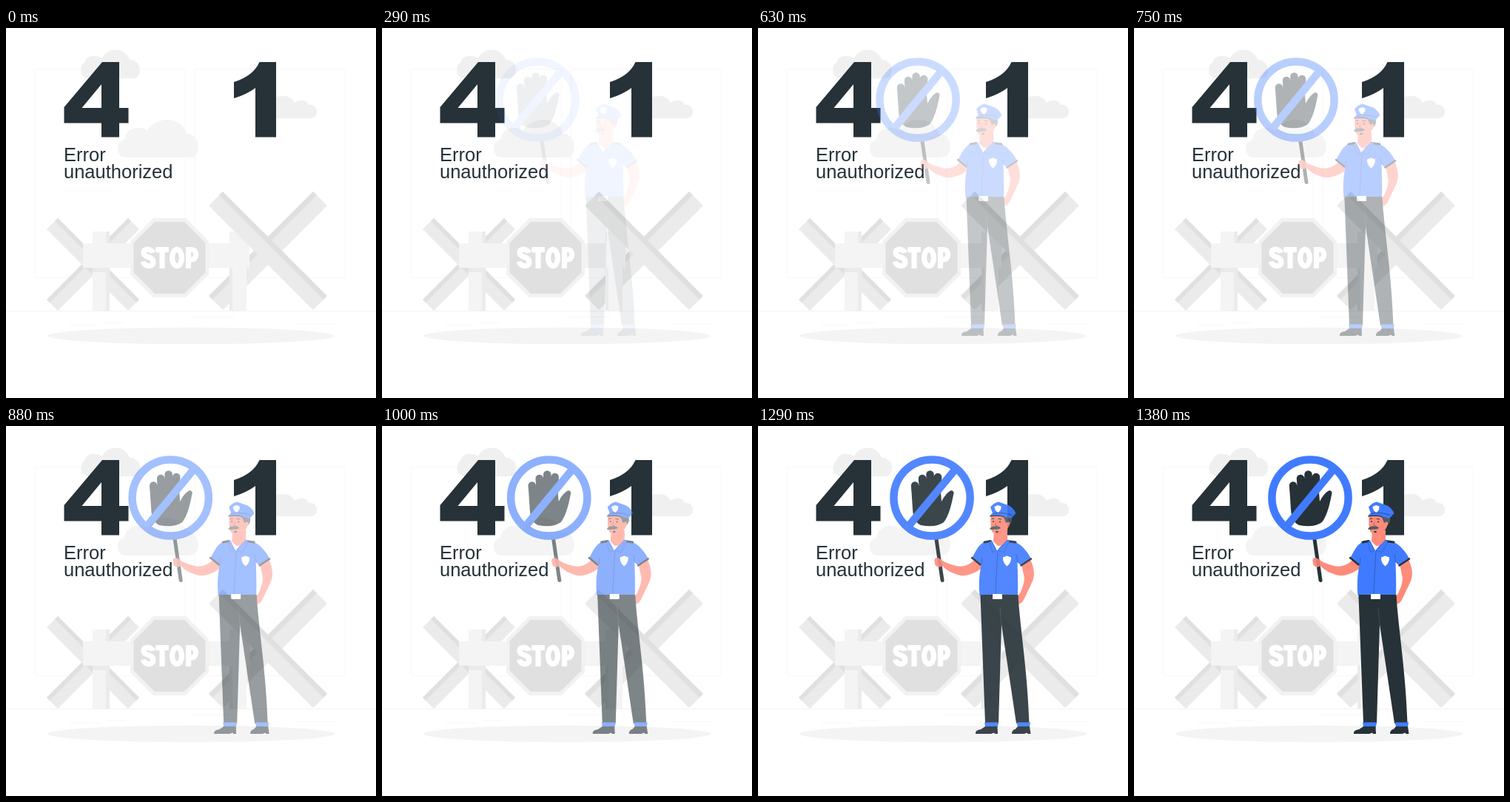
An HTML page that plays this animation: 500x500 px, repeating every 1430 ms.

```html
<!DOCTYPE html>
<html lang="en">
<head>
<meta charset="utf-8">
<title>401 Error unauthorized</title>
<style>
  html, body { margin: 0; width: 100%; height: 100%; overflow: hidden; background: #fff; }
  svg { display: block; width: 100vw; height: 100vh; }
  .ink { fill: #263238; }
  .blue { fill: #407bff; }
  .skin { fill: #ff8b7b; }
  .white { fill: #fff; }
  .line { fill: none; stroke-linecap: round; stroke-linejoin: round; }
  .message { font: 25.5px "Liberation Sans", Arial, sans-serif; }
</style>
</head>
<body>
<svg viewBox="0 0 500 500">
  <!-- Room -->
  <g fill="none" stroke="#f8f8f8">
    <rect x="39.5" y="55.5" width="203" height="282" rx="2"/>
    <rect x="255.5" y="55.5" width="203" height="282" rx="2"/>
    <path stroke="#f3f3f3" d="M0 382.5H500"/>
    <path d="M248 390.5h62M392 399.5h54M85 401.5h40M135 398.5h25"/>
  </g>
  <path fill="#f0f0f0" d="M110 68C99 66 99 50 107 46C108 36 123 36 130 41C136 26 161 25 167 43C184 42 185 67 173 68Z"/>
  <path fill="#f4f4f4" d="M162 175C147 174 147 154 160 151C161 136 181 130 191 139C201 120 236 117 244 143C262 141 266 173 249 175Z"/>
  <path fill="#f0f0f0" d="M355 122V100C364 89 385 89 390 101C398 95 408 98 409 104C422 102 424 121 412 122Z"/>
  <ellipse cx="250" cy="416" rx="194" ry="11.3" fill="#f4f4f4"/>

  <!-- Barrier -->
  <g fill="#ebebeb">
    <path d="M165 257l15 15L70 382l-15-15z"/>
    <path fill="#e0e0e0" d="M165 257l4 4L59 371l-4-4z"/>
    <path d="M70 257l110 110l-15 15L55 272z"/>
    <path fill="#e0e0e0" d="M70 257l110 110l-4 4L66 261zM104 321l13 12V324z"/>
    <path d="M415 221l19 19L293 381l-19-19z"/>
    <path fill="#e0e0e0" d="M415 221l5 5L279 367l-5-5z"/>
  </g>
  <g fill="#f4f4f4">
    <path d="M117 275h23v107h-23zM302 275h23v107h-23z"/>
    <path fill="#ebebeb" d="M135 275h5v107h-5zM302 324h4v58h-4zM117 324h23v6h-23z"/>
    <rect x="104" y="291" width="225" height="33"/>
  </g>
  <path fill="#ebebeb" d="M293 221l141 141l-19 19L274 240z"/>
  <path fill="#e0e0e0" d="M293 221l141 141l-5 5L288 226z"/>
  <path fill="#f2f2f2" d="M199 257h44l31 31v45l-31 31h-44l-31-31v-45z"/>
  <path fill="#e0e0e0" d="M201 262h40l28.5 28.5v40L241 359h-40l-28.5-28.5v-40z"/>
  <g role="img" aria-label="STOP" fill="none" stroke="#fff" stroke-width="7.2">
    <path d="M198 304C196.500 297.500 186 297.500 186 303.500C186 311 199 307.500 199 316.500C199 323.500 186.500 323.500 185.500 315.500"/>
    <path d="M202 299.700h18M211 297v28"/>
    <ellipse cx="231" cy="310.5" rx="6.5" ry="11.2"/>
    <path d="M246.500 325V299.500H251C258.500 299.500 258.500 313 251 313H247"/>
  </g>

  <!-- Headline -->
  <g class="ink">
    <g role="img" aria-label="4 1">
      <path fill-rule="evenodd" d="M130 46h23v62h12.500v20.500H153V147.500h-24V128.500H78.500v-21.500zM129 76l-26.500 32H129z"/>
      <path d="M342.500 46H365v101.500h-28V81Q325 90 308 95V73Q334 65 342.500 46z"/>
    </g>
    <text class="message" x="78" y="179.5">Error</text>
    <text class="message" x="78" y="202.5">unauthorized</text>
  </g>

  <!-- Officer -->
  <g id="officer" opacity="0">
    <path class="line" stroke="#263238" stroke-width="5" d="M243.500 150L252 208.500"/>
    <circle class="white" cx="238" cy="97" r="51"/>
    <g class="line" stroke="#263238" stroke-width="10.5">
      <path d="M215 80.500L220 112M225 71L228 110M235.500 65.500L236 110M246 69L243 110"/>
      <path class="ink" stroke="none" d="M210 82L249 78L251 102Q257 90 264 87Q269 88 267 93Q262 120 254 130Q243 138 223 134Q213 130 212 113Z"/>
    </g>
    <g class="line" stroke="#407bff" stroke-width="10.5">
      <circle cx="238" cy="97" r="51.6"/>
      <path stroke-linecap="butt" d="M205 137L270 58"/>
    </g>

    <!-- Arms -->
    <path class="skin" d="M301 174L311 188C299 198 287 203 277 202C267 200 259 196 252 189C247 193 241 189 242 184C240 180 244 176 248 179L254 183C264 188 274 191 282 189C290 187 296 181 301 174Z"/>
    <path class="skin" d="M359 187L371 180C378 196 377 205 371 216L362 235Q357 243 352 240L350 235L357 226C362 216 364 207 362 201Z"/>
    <path class="line" stroke="#263238" stroke-width="4.5" d="M248 180L249.500 189" opacity=".15"/>

    <!-- Trousers and shoes -->
    <path class="ink" d="M303.500 230H354.500C358 280 367 330 369.500 402H352L332 268L328 402H310Z"/>
    <path class="line" stroke="#455a64" stroke-width=".7" d="M332 268L330 246"/>
    <path class="blue" d="M309 400.500h19l-1 6h-17zM352.500 400.500h18.500l-1 6h-16z"/>
    <path class="ink" d="M310 406h16.500l.5 10h-4l-1-1.500-4 1.500H297Q296 411 304 410ZM354 406h16l1.500 10h-4l-1-1.500-4 1.500H346Q345.500 411 351 409.500Z"/>

    <!-- Shirt -->
    <path class="blue" d="M308 157C319 154 335 153 351 157C360 161 367 170 372 179L358 188.500L353.500 184C354 200 354.500 215 354 229H302.500C301 213 302 199 305 187L292 179C297 169 301 161 308 157Z"/>
    <path class="line" stroke="#263238" stroke-width="2.5" d="M292 178L303.500 187.500M358.500 188.500L372 179.500"/>
    <path class="line" stroke="#2d56b3" stroke-width=".8" d="M327 169Q325 197 324 227M354 184L352 174M305 187L306 178"/>
    <path class="line" stroke="#263238" stroke-width="3" d="M309 157L317 155.500M340 155.500L351 157"/>
    <path class="ink" d="M303.500 228h51v6H304z"/>
    <rect class="white" x="320" y="227" width="13" height="7" rx=".8"/>
    <path class="white" d="M339.500 175.500l5.500 2Q345.500 185 339.500 189.500Q333.500 185 334 177.500z"/>

    <!-- Head -->
    <path class="white" d="M319 155L338 154L326 168.500Z"/>
    <path class="skin" d="M322 141H340V154Q334 163 327 162L321 156Z"/>
    <path class="skin" d="M318 119H342C344 128 343 137 338 142C332 148.500 321 147 319 142Q316 132 318 119Z"/>
    <path class="blue" stroke="#2d56b3" stroke-width=".6" d="M318.500 155L325 168L320 171L316 157ZM340 154L327 168L335 171L343 156Z"/>
    <path fill="#535b60" d="M333 121H345Q348 129 343 134L338 131L336 126Z"/>
    <path class="skin" d="M338 131Q344 127 343 133Q341 139 337 137Z"/>
    <path fill="#535b60" d="M316 139.500Q318 135 323 135.500Q329 134.500 331 138Q328 140.500 323 139.500Q320 141 316 139.500Z"/>
    <g class="ink">
      <circle cx="321" cy="129" r="1"/>
      <circle cx="330" cy="129.500" r="1"/>
      <ellipse cx="326" cy="143" rx="2" ry="1"/>
    </g>
    <path class="line" stroke="#263238" stroke-width=".9" d="M319 125.500L322 125M328 125.500L332 126"/>
    <path class="line" stroke="#b5584d" stroke-width=".8" d="M325 130L323.500 134L326 134.500"/>
    <path class="blue" d="M317 109.500Q323 103 328 102.500Q333 104 338 106Q347 108 351.500 118L345 125Q332 120 317 122.500Q316 120 320 118Z"/>
    <path class="line" stroke="#2d56b3" stroke-width="1.2" d="M320 118.500Q333 115.500 346 120.500"/>
    <path class="line" stroke="#263238" stroke-width="1.2" d="M316.500 122Q326 120 335 122.500"/>
    <path class="white" d="M327 107l4.500 1.500Q332 114 327.500 117Q322.500 114 322.500 109z"/>
  </g>
</svg>
<script>
  const officer = document.getElementById('officer');
  const LOOP = 1430, FPS = 24, LAST = 33, HIDDEN = 250, SLIDE = 30;

  // cubic-bezier(.42, 0, 1, 1)
  function easeIn(p) {
    if (p >= 1) return 1;
    let lo = 0, hi = 1;
    for (let i = 0; i < 24; i++) {
      const u = (lo + hi) / 2, v = 1 - u;
      const x = 1.26 * v * v * u + 3 * v * u * u + u ** 3;
      if (x < p) lo = u; else hi = u;
    }
    return 3 * (1 - lo) * lo * lo + lo ** 3;
  }

  function draw() {
    const t = performance.now() % LOOP;
    const step = Math.min(LAST, Math.floor((t + 10) * FPS / 1000));
    const e = easeIn(step / LAST);
    officer.setAttribute('opacity', t < HIDDEN ? 0 : e);
    officer.setAttribute('transform', `translate(${SLIDE * (e - 1)} 0)`);
    requestAnimationFrame(draw);
  }
  draw();
</script>
</body>
</html>
```
